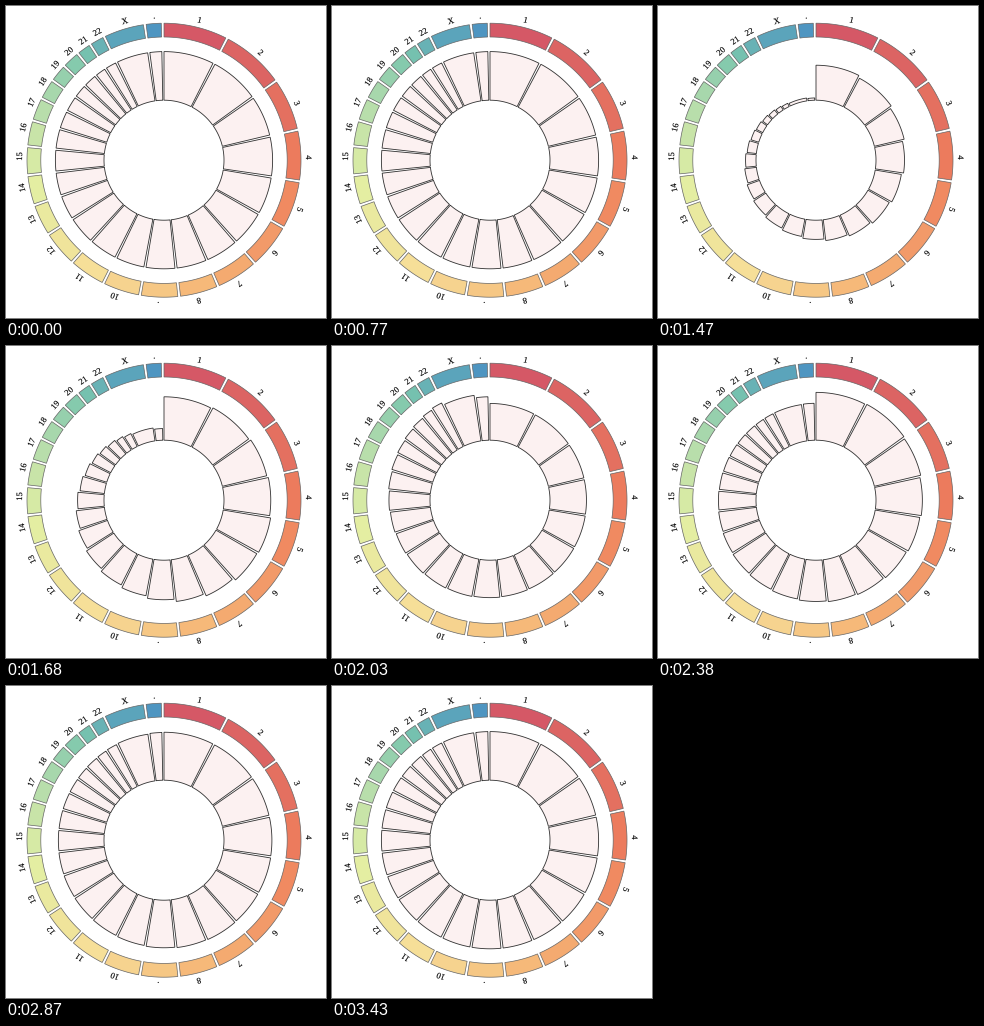
Recreate the animation shown at these times as a matplotlib script. Size 320 by 312 pixels, loop 3710 ms.

```python
import numpy as np
import matplotlib.pyplot as plt
from matplotlib.animation import FuncAnimation
from matplotlib.colors import LinearSegmentedColormap
from matplotlib.patches import PathPatch, Polygon
from matplotlib.textpath import TextPath
from matplotlib.transforms import Affine2D

W, H, DPI = 320, 312, 100
FRAMES, INTERVAL = 53, 70
PX = 72 / DPI

CX, CY = 158, 154.2
RING = (123.2, 137)
BARS = (60, 108.6)
LABEL_BASE, LABEL_SIZE = 142, 8.5
GAP = 0.02
N = 24

# Chromosome lengths in megabases, linear between these positions
LENGTH_KEYS = {0: 249, 1: 243, 2: 198, 3: 191, 7: 146, 11: 132, 12: 115,
               14: 102, 18: 61, 19: 61, 20: 49, 21: 51, 22: 155, 23: 59}

SPECTRAL = LinearSegmentedColormap.from_list("ring", [
    "#d53e4f", "#f46d43", "#fdae61", "#fee08b",
    "#e6f598", "#abdda4", "#66c2a5", "#3288bd"])
RING_ALPHA, RING_SHADE = 0.85, 0.97

# The bars restart at RESET and bounce out one after another
RESET, START = 12, 11.7
DURATION, STAGGER = 30.15, 0.01


def ring_color(i):
    rgb = np.array(SPECTRAL(i / (N - 1))[:3])
    return (rgb * RING_ALPHA + 1 - RING_ALPHA) * RING_SHADE


def label(i):
    if i in (8, 23):
        return "."
    return "X" if i == 22 else str(i + 1)


def polar(r, a):
    return np.column_stack([CX + r * np.sin(a), CY - r * np.cos(a)])


def sector(r0, r1, a0, a1):
    a = np.linspace(a0, a1, 30)
    return np.vstack([polar(r1, a), polar(r0, a[::-1])])


def label_path(text, start):
    """Text that begins at angle start and follows the circle."""
    path = TextPath((0, 0), text, size=LABEL_SIZE,
                    prop={"family": "Liberation Serif"})
    half = path.get_extents().x1 / 2
    place = (Affine2D().translate(-half, LABEL_BASE).scale(1, -1)
             .rotate(start + half / LABEL_BASE).translate(CX, CY))
    return place.transform_path(path)


def bounce_out(p):
    p = min(max(p, 0), 1)
    k = 7.5625
    if p < 4 / 11:
        return k * p * p
    if p < 8 / 11:
        return k * (p - 6 / 11) ** 2 + 3 / 4
    if p < 10 / 11:
        return k * (p - 9 / 11) ** 2 + 15 / 16
    return k * (p - 21 / 22) ** 2 + 63 / 64


def bar_height(n, i):
    if n < RESET:
        return 1
    return bounce_out((n - START) / DURATION - STAGGER * i)


lengths = np.interp(range(N), list(LENGTH_KEYS), list(LENGTH_KEYS.values()))
spans = lengths / lengths.sum() * (2 * np.pi - N * GAP)
ends = np.cumsum(spans + GAP) - GAP
starts = ends - spans

fig = plt.figure(figsize=(W / DPI, H / DPI), dpi=DPI, facecolor="white")
ax = fig.add_axes([0, 0, 1, 1])
ax.set_xlim(0, W)
ax.set_ylim(H, 0)
ax.axis("off")

bars = []
for i, (a0, a1) in enumerate(zip(starts, ends)):
    ax.add_patch(Polygon(sector(*RING, a0, a1), facecolor=ring_color(i),
                         edgecolor="#666666", linewidth=0.7 * PX))
    bar = Polygon(sector(*BARS, a0, a1), facecolor="#fcf1f1",
                  edgecolor="#333333", linewidth=0.85 * PX,
                  joinstyle="miter")
    bars.append(ax.add_patch(bar))
    ax.add_patch(PathPatch(label_path(label(i), (a0 + a1) / 2),
                           facecolor="black", edgecolor="black",
                           linewidth=0.15 * PX))


def update(n):
    r0, r1 = BARS
    for i, bar in enumerate(bars):
        top = r0 + (r1 - r0) * bar_height(n, i)
        bar.set_xy(sector(r0, top, starts[i], ends[i]))
    return bars


anim = FuncAnimation(fig, update, frames=FRAMES, interval=INTERVAL,
                     repeat=True, repeat_delay=0, blit=False)
plt.show()
```
